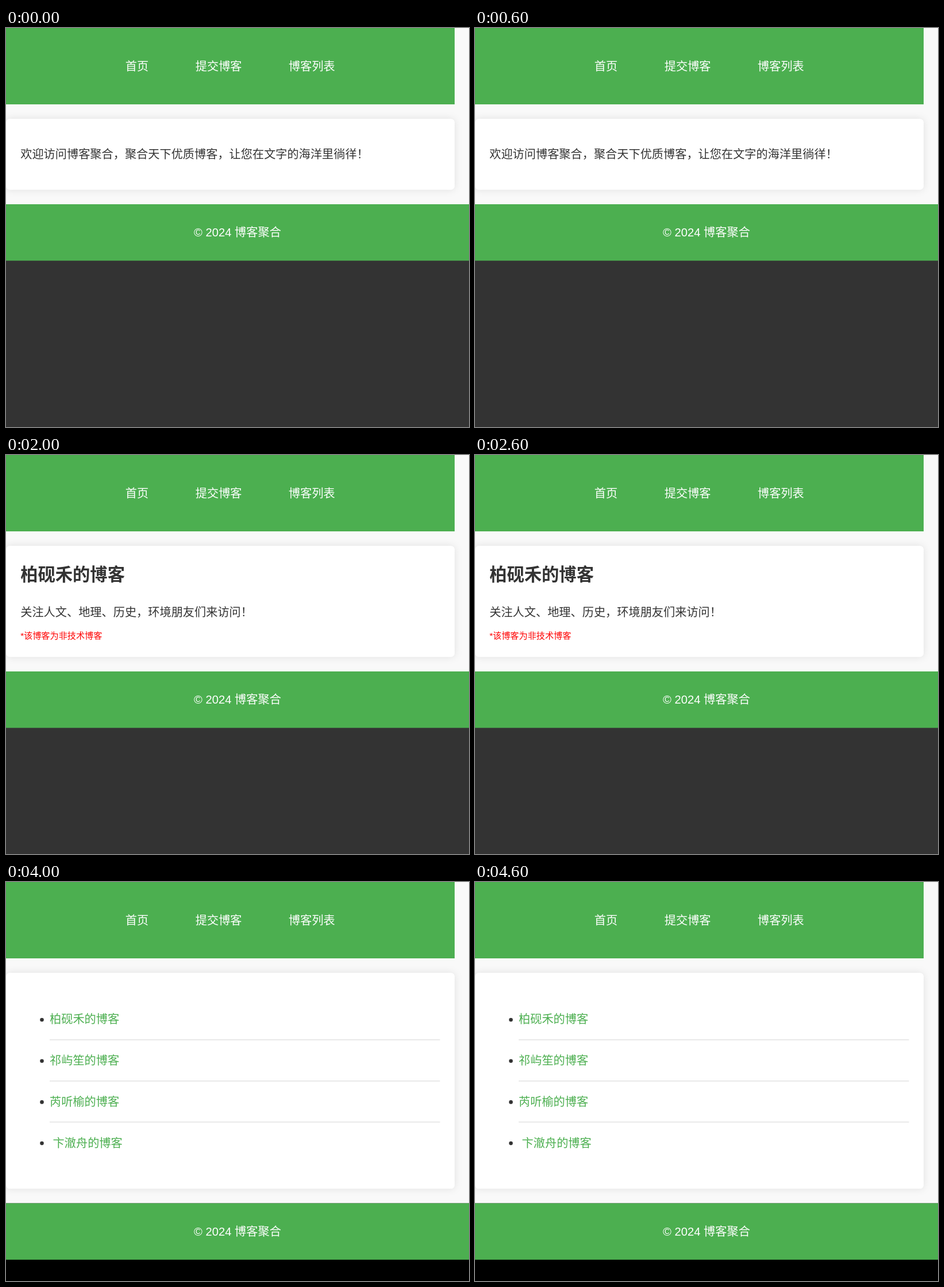
These frames come from a looping animation (806 px wide and 695 px high, 5 s). An HTML page:

```html
<!DOCTYPE html>
<html lang="zh-CN">
<head>
<meta charset="utf-8">
<style>
  html, body { margin: 0; width: 100%; height: 100%; overflow: hidden; }
  svg { display: block; font-family: "Liberation Sans", "Noto Sans CJK SC", "Noto Sans CJK", sans-serif; }
  .card { fill: #fff; filter: drop-shadow(0 0 6.3px rgba(0, 0, 0, .1)); }
  .pen { fill: none; stroke-width: 1.25; }
</style>
</head>
<body>
<svg id="stage" width="806" height="695" viewBox="0 0 806 695"></svg>
<script>
const GREEN = '#4CAF50', INK = '#333', EDGE = '#767676';
const BASE = 20.2, SMALL = 16.8;
const stage = document.getElementById('stage');

const rect = (x, y, w, h, fill, extra = '') =>
  `<rect x="${x}" y="${y}" width="${w}" height="${h}" fill="${fill}" ${extra}/>`;

// cy is the vertical middle of the line of text
const text = (x, cy, str, fill = INK, size = BASE, extra = '') =>
  `<text x="${x}" y="${cy + size * .37}" font-size="${size}" fill="${fill}" ${extra}>${str}</text>`;

const line = (d, color) => `<path class="pen" d="${d}" stroke="${color}"/>`;

const box = (x, y, w, h, color, r) =>
  rect(x, y, w, h, '#fff', `rx="${r}" stroke="${color}" stroke-width="1.25"`);

const blogs = ['柏砚禾的博客', '祁屿笙的博客', '芮听榆的博客', '卞澈舟的博客'];

const list = count => blogs.slice(0, count).map((name, i) => {
  const y = 239 + i * 71.7;
  return `<circle cx="62.5" cy="${y + 1}" r="3.3" fill="${INK}"/>`
    + text(i === 3 ? 81.6 : 76, y, name, GREEN)
    + (i < count - 1 ? line(`M76 ${y + 35.8}H755.5`, '#ddd') : '');
}).join('');

const home = () => text(25.2, 220, '欢迎访问博客聚合，聚合天下优质博客，让您在文字的海洋里徜徉！');

const detail = () =>
  text(25.2, 208, blogs[0], INK, 30.3, 'font-weight="bold"')
  + text(25.2, 273.5, '关注人文、地理、历史，环境朋友们来访问！')
  + text(25.2, 314, '*该博客为非技术博客', 'red', 15.15);

const form = () =>
  text(25.2, 225, '博客名称：')
  + box(25.8, 245.2, 184.5, 25.8, EDGE, 2)
  + text(35, 258.3, blogs[3], '#000', SMALL)
  + text(25.2, 290, '博客描述：')
  + box(25.8, 320, 729, 65.4, '#ccc', 5)
  + text(39.5, 345, '让我们即刻起帆，寻找心灵深处的蔚蓝海洋！', '#000', SMALL)
  + line('M743.5 384L753 374.5M748.5 384L753 379.5', '#555')
  + text(25.2, 424, '技术博客：')
  + box(25.8, 446.2, 43.7, 22.5, EDGE, 2.5)
  + text(31.3, 457.5, '否', '#000', SMALL)
  + line('M54.3 454.8L59.4 460L64.5 454.8', '#000')
  + rect(25.2, 498, 71.6, 48.5, '#45a049', 'rx="5"')
  + text(44.2, 522.5, '提交', '#fff', SMALL);

const scenes = [
  { foot: 307, body: home },
  { foot: 488.4, body: () => list(3) },
  { foot: 377, body: detail },
  { foot: 597, body: form },
  { foot: 559.6, body: () => list(4), below: '#000' }
];

const page = ({ foot, body, below = INK }) =>
  rect(0, 0, 806, 695, below)
  + rect(0, 0, 806, foot, '#f9f9f9')
  + rect(0, 0, 781, 133, GREEN)
  + text(207.7, 66.5, '首页', '#fff')
  + text(329.8, 66.5, '提交博客', '#fff')
  + text(492, 66.5, '博客列表', '#fff')
  + rect(0, 158.3, 781, foot - 25.3 - 158.3, '#fff', 'rx="6.3" class="card"')
  + body()
  + rect(0, foot, 806, 98.3, GREEN)
  + text(403, foot + 49, '© 2024 博客聚合', '#fff', BASE, 'text-anchor="middle"');

let shown = -1;
function draw() {
  const now = Math.floor(performance.now() % 5000 / 1000);
  if (now !== shown) stage.innerHTML = page(scenes[shown = now]);
  requestAnimationFrame(draw);
}
draw();
</script>
</body>
</html>
```
